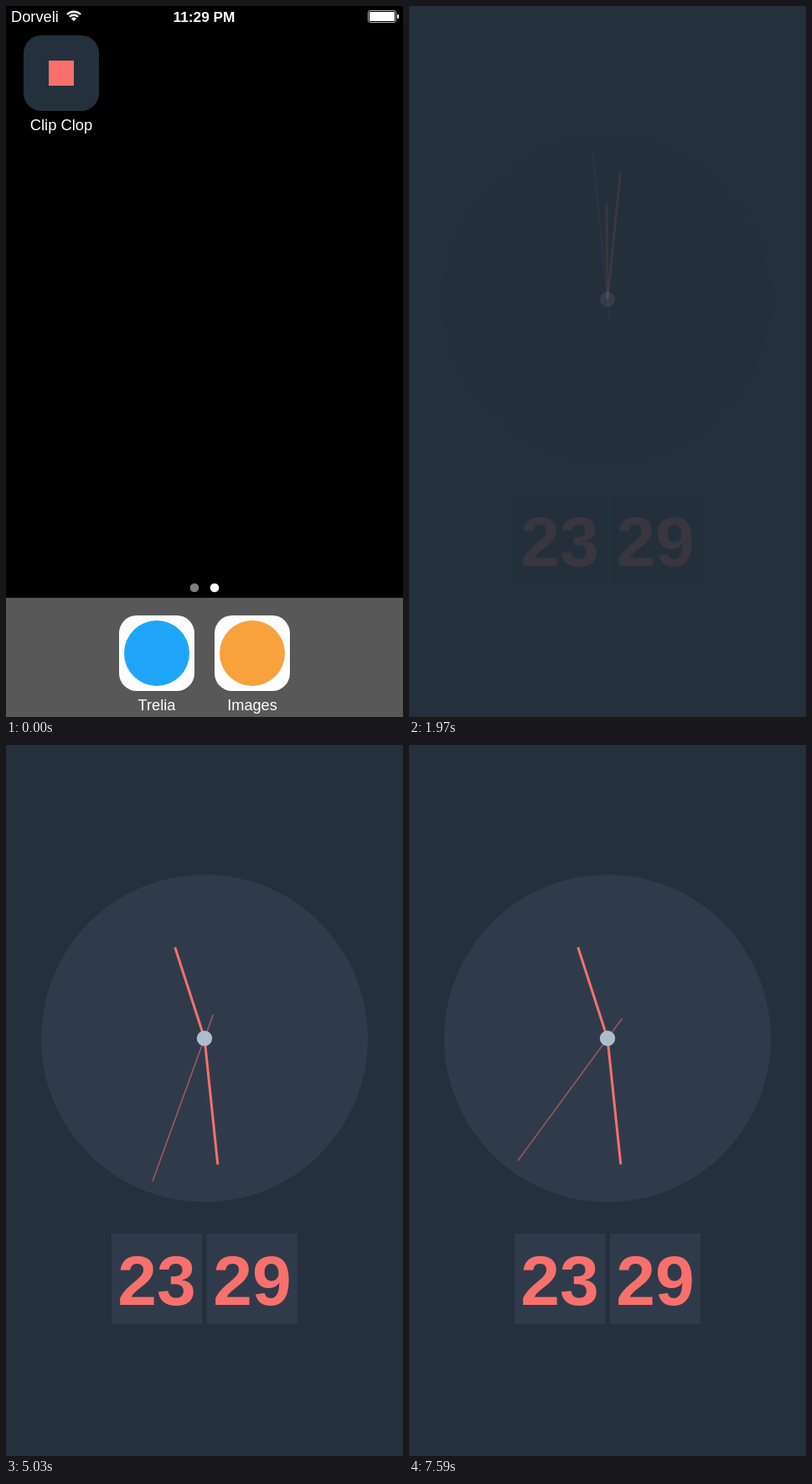
These frames come from a looping animation (474 px wide and 847 px high, 7.63 s). An HTML page with a canvas:

```html
<!DOCTYPE html>
<html lang="en">
<head>
<meta charset="utf-8">
<title>Clock app</title>
<style>
  html, body { margin: 0; width: 100%; height: 100%; overflow: hidden; background: #000; }
  canvas { display: block; width: 474px; height: 847px; }
</style>
</head>
<body>
<canvas id="stage" width="474" height="847"></canvas>
<script>
const W = 474, H = 847, LOOP = 7630;
const NAVY = '#24303c', PANEL = '#2f3b4b', CORAL = '#f8706c';
const SANS = '"Liberation Sans", Arial, sans-serif';
const ICON = { x: 21, y: 35, size: 90 };
const HUB = { x: 237, y: 349.5 };
const PRESS = 1260, ZOOM = 1340, OPEN = 1790, FADE = 1845, SWEEP = 975;
const ctx = document.getElementById('stage').getContext('2d');

const clamp = v => Math.min(1, Math.max(0, v));
const span = (t, from, to) => clamp((t - from) / (to - from));
const lerp = (a, b, p) => a + (b - a) * p;
const easeOut = p => 1 - (1 - p) ** 3;

// Equivalent to cubic-bezier(.42, 0, .58, 1)
function easeInOut(x) {
  let lo = 0, hi = 1;
  for (let i = 0; i < 20; i++) {
    const s = (lo + hi) / 2, r = 1 - s;
    if (1.26 * s * r * r + 1.74 * s * s * r + s ** 3 < x) lo = s; else hi = s;
  }
  return lo * lo * (3 - 2 * lo);
}

// Linear interpolation through [time, value] pairs
function track(t, keys) {
  let i = 1;
  while (i < keys.length - 1 && t > keys[i][0]) i++;
  const [a, b] = [keys[i - 1], keys[i]];
  return lerp(a[1], b[1], span(t, a[0], b[0]));
}

function rect(x, y, w, h, color, r = 0) {
  ctx.fillStyle = color;
  ctx.beginPath();
  ctx.roundRect(x, y, w, h, r);
  ctx.fill();
}

function disc(x, y, r, color) {
  ctx.fillStyle = color;
  ctx.beginPath();
  ctx.arc(x, y, r, 0, Math.PI * 2);
  ctx.fill();
}

function label(str, x, y, font, align = 'center', color = '#fff') {
  ctx.font = font + ' ' + SANS;
  ctx.textAlign = align;
  ctx.fillStyle = color;
  ctx.fillText(str, x, y);
}

function drawWifi(x, y) {
  ctx.strokeStyle = '#fff';
  ctx.lineWidth = 2.4;
  for (const r of [7.2, 11.3]) {
    ctx.beginPath();
    ctx.arc(x, y, r, -Math.PI * 0.75, -Math.PI * 0.25);
    ctx.stroke();
  }
  ctx.fillStyle = '#fff';
  ctx.beginPath();
  ctx.moveTo(x, y);
  ctx.arc(x, y, 4.4, -Math.PI * 0.75, -Math.PI * 0.25);
  ctx.fill();
}

function drawStatus() {
  label('Dorveli', 6, 19, '18.3px', 'left');
  drawWifi(81, 18);
  label('11:29 PM', 236.5, 19, 'bold 17.3px');
  ctx.strokeStyle = '#b4b4b4';
  ctx.lineWidth = 1;
  ctx.beginPath();
  ctx.roundRect(432.5, 5.5, 33, 14, 2.5);
  ctx.stroke();
  rect(434, 7, 30, 11, '#fff', 1);
  rect(467, 10, 2, 5, '#fff', 1);
}

function drawDockIcon(x, color, name) {
  rect(x, 726, 90, 90, '#fdfdfd', 21);
  disc(x + 45, 771, 39, color);
  label(name, x + 45, 839, '18.2px');
}

function drawHome(pressed) {
  rect(ICON.x, ICON.y, ICON.size, ICON.size, pressed ? '#121a21' : NAVY, 21);
  rect(51, 65, 30, 30, pressed ? '#a4504d' : CORAL);
  label('Clip Clop', 66, 148, '18.4px');
  disc(225, 693, 5.3, '#7f7f7f');
  disc(249, 693, 5.3, '#fff');
  rect(0, 705, W, 142, '#585858');
  drawDockIcon(135, '#1fa5f8', 'Trelia');
  drawDockIcon(249, '#f7a23c', 'Images');
}

function drawCursor(x, y) {
  const shape = [[0, 0], [0, 15.5], [3.7, 12.2], [6.2, 17.6], [8.8, 16.5], [6.4, 11.2], [11, 11]];
  ctx.beginPath();
  for (const [dx, dy] of shape) ctx.lineTo(x + dx, y + dy);
  ctx.closePath();
  ctx.fillStyle = '#000';
  ctx.fill();
  ctx.strokeStyle = '#fff';
  ctx.lineWidth = 1.1;
  ctx.stroke();
}

function drawLauncher(t) {
  rect(0, 0, W, H, '#000');
  const p = easeInOut(span(t, ZOOM - 30, OPEN));
  if (t < ZOOM) {
    drawHome(t >= PRESS);
    drawStatus();
  } else {
    const x = lerp(ICON.x, 0, p), y = lerp(ICON.y, 0, p);
    const w = lerp(ICON.size, W, p), h = lerp(ICON.size, H, p);
    const s = w / ICON.size;
    ctx.save();
    ctx.translate(x + w / 2, y + h / 2);
    ctx.scale(s, s);
    ctx.translate(-66, -80);
    ctx.globalAlpha = 1 - p * 0.6;
    drawHome(false);
    ctx.restore();
    ctx.globalAlpha = clamp(p * 2.5);
    rect(x, y, w, h, NAVY, 21 * s * (1 - p));
    ctx.globalAlpha = 1 - p;
    drawStatus();
    ctx.globalAlpha = 1;
  }
  if (t >= 630) {
    const m = easeOut(span(t, 610, 1050));
    drawCursor(lerp(-11, 52.5, m), lerp(72.5, 76.5, m));
  }
}

function drawHand(deg, length, tail, width, color) {
  ctx.save();
  ctx.translate(HUB.x, HUB.y);
  ctx.rotate(deg * Math.PI / 180);
  ctx.strokeStyle = color;
  ctx.lineWidth = width;
  ctx.beginPath();
  ctx.moveTo(0, tail);
  ctx.lineTo(0, -length);
  ctx.stroke();
  ctx.restore();
}

function secondAngle(t, sweep) {
  if (t < 3730) return -174 * sweep;
  return 180 + track(t, [[3730, 13.1], [4470, 17.5], [5030, 20], [5250, 22.3], [7590, 36.3]]);
}

function drawClock(t) {
  rect(0, 0, W, H, NAVY);
  if (t < 1970) return;
  const fade = span(t, FADE, FADE + SWEEP);
  const sweep = easeInOut(fade);
  ctx.globalAlpha = fade * fade;
  disc(HUB.x, HUB.y, 195, PANEL);
  rect(126, 582, 108, 108, PANEL);
  rect(240, 582, 108, 108, PANEL);
  ctx.globalAlpha = fade ** 1.1;
  label('23', 180, 667, 'bold 84px', 'center', CORAL);
  label('29', 294, 667, 'bold 84px', 'center', CORAL);
  drawHand(secondAngle(t, sweep), 181, 30, 1.5, 'rgba(248,112,108,0.58)');
  drawHand(-18 * sweep, 114, 0, 3, CORAL);
  drawHand(174 * sweep, 151, 0, 3, CORAL);
  disc(HUB.x, HUB.y, 9.2, '#aebdcd');
  ctx.globalAlpha = 1;
}

const start = performance.now();
function frame(now) {
  const t = Math.max(0, now - start) % LOOP;
  if (t < OPEN) drawLauncher(t); else drawClock(t);
  requestAnimationFrame(frame);
}
frame(start);
</script>
</body>
</html>
```
